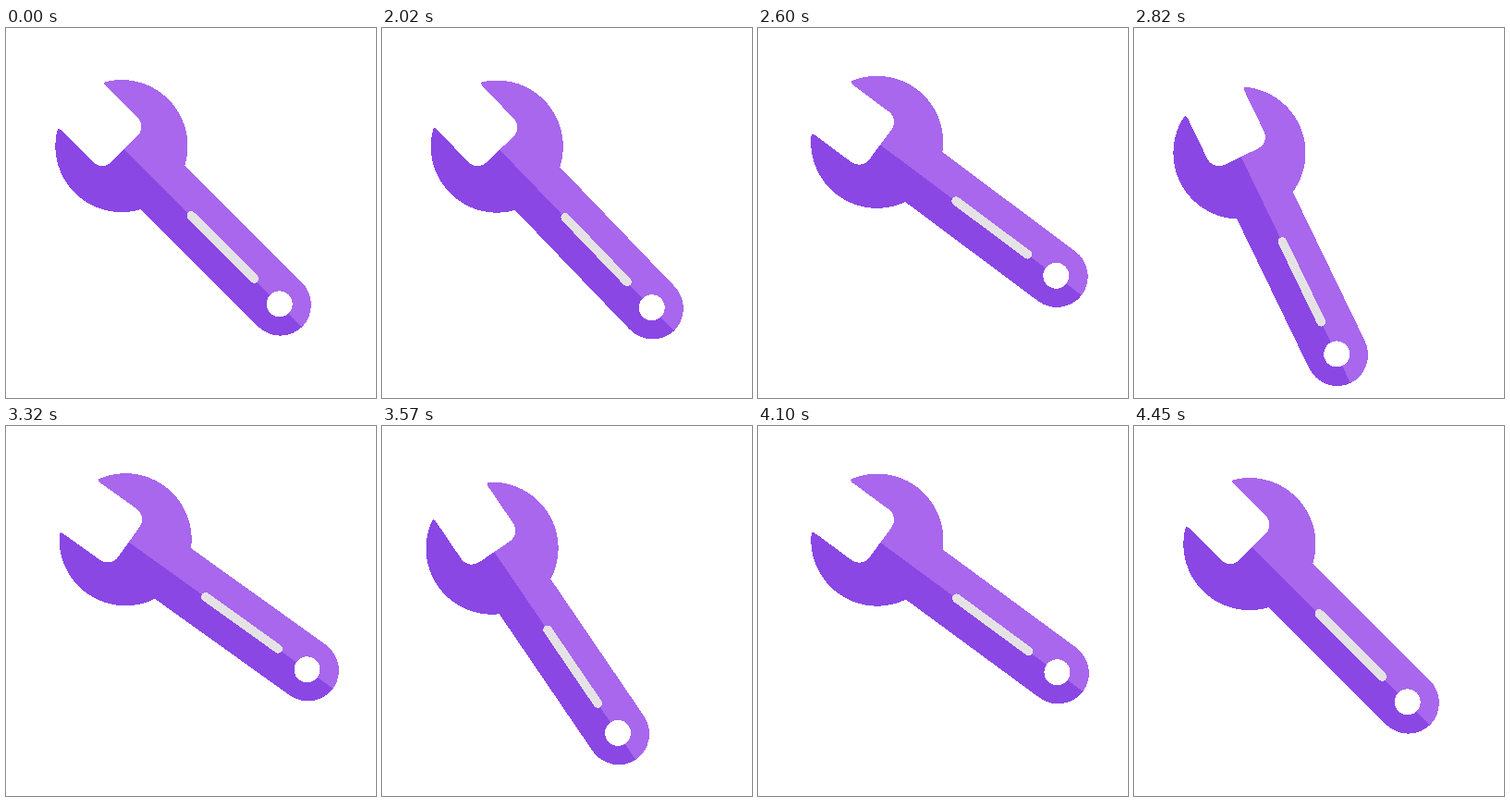
An HTML page that plays this animation: 400x400 px, repeating every 4470 ms.

```html
<!DOCTYPE html>
<html lang="en">
<head>
<meta charset="utf-8">
<title>Wrench</title>
<style>
  html, body { margin: 0; width: 100%; height: 100%; overflow: hidden; background: #fff; }
  svg { display: block; width: 100%; height: 100%; }
</style>
</head>
<body>
<svg viewBox="0 0 400 400" shape-rendering="crispEdges">
  <defs>
    <path id="half" d="M4.5 .3V-20A14 14 0 0 0 -9.5 -34H-58.5Q-63.2 -34.3 -60.6 -38
      A71.5 71.5 0 0 1 63.1 -33.6H242A34.3 34.3 0 0 1 276.4 .3Z"/>
  </defs>
  <g id="wrench">
    <g transform="translate(124.9 127.6) rotate(45)">
      <use href="#half" transform="scale(1 -1)" fill="#8a47e4"/>
      <use href="#half" fill="#a867ec"/>
      <path d="M106.5 0H203" stroke="#e5e2e5" stroke-width="9.5" stroke-linecap="round"/>
      <circle cx="241.5" r="14" fill="#fff"/>
    </g>
  </g>
</svg>
<script>
  const LOOP = 4470, START = 2020;
  const HIGH = 22, LOW = -10;
  // Times in ms at which the swing starts, turns and comes to rest
  const turns = [2012, 2067, 2550, 2884, 3362, 3711, 3991, 4450];
  const last = turns.length - 1;
  const wrench = document.getElementById('wrench');

  const ease = u => (1 - Math.cos(Math.PI * u)) / 2;

  // Turning points alternate between HIGH and LOW, with rest at both ends
  const poseAt = i => i === 0 || i === last ? 0 : i % 2 ? HIGH : LOW;

  function angleAt(t) {
    if (t <= turns[0] || t >= turns[last]) return 0;
    const i = turns.findIndex(x => x > t);
    const from = poseAt(i - 1), u = (t - turns[i - 1]) / (turns[i] - turns[i - 1]);
    return from + (poseAt(i) - from) * ease(u);
  }

  // Steps last 30 and 20 ms in turn
  function stepTime(t) {
    if (t < START) return 0;
    const r = (t - START) % 50;
    return t - r + (r >= 30 ? 30 : 0);
  }

  function draw(t) {
    wrench.setAttribute('transform', `rotate(${angleAt(stepTime(t)).toFixed(3)} 97.4 99.1)`);
  }

  const begin = performance.now();
  function tick() {
    draw((performance.now() - begin) % LOOP);
    requestAnimationFrame(tick);
  }
  tick();
</script>
</body>
</html>
```
